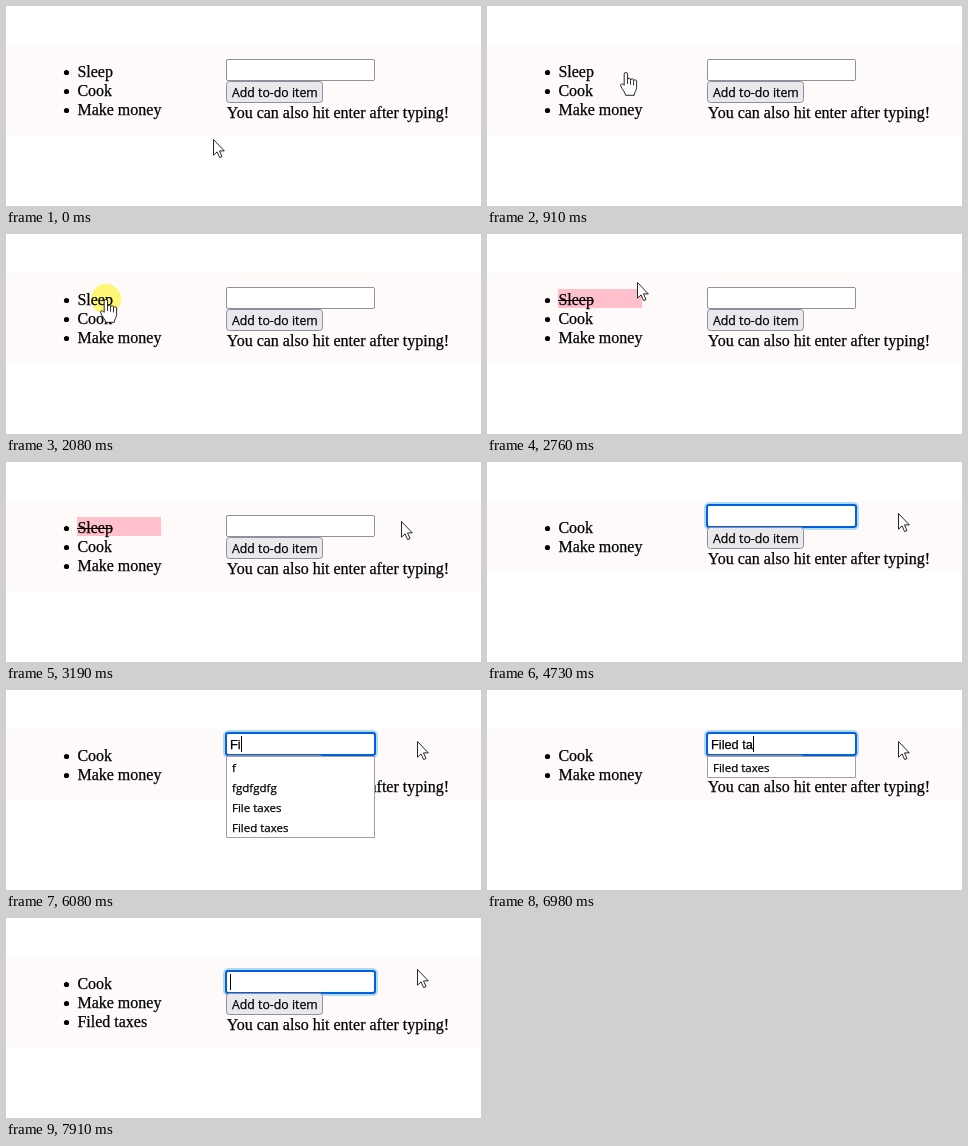
An HTML page with a canvas for the animation above (8 s loop, 475 px wide and 200 px high).

```html
<!DOCTYPE html>
<html lang="en">
<head>
<meta charset="utf-8">
<title>To-do list</title>
<style>
html, body { margin: 0; width: 100%; height: 100%; overflow: hidden; background: #fff; }
canvas { display: block; width: 475px; height: 200px; }
</style>
</head>
<body>
<canvas id="stage" width="475" height="200"></canvas>
<script>
const ctx = document.getElementById('stage').getContext('2d');
const LOOP = 8000;
const SERIF = '16px "Liberation Serif", "Times New Roman", serif';
const FIELD = '12.8px "Liberation Sans", Arial, sans-serif';
const BUTTON = '12.3px "Open Sans", "Noto Sans", sans-serif';
const MENU = '11.5px "Open Sans", "Noto Sans", sans-serif';

// Moments of the story, in ms
const CLICK = 2080, PRESS = 100, REMOVED = 3230, FOCUS = 4210;
const TYPING = 5840, KEY_GAP = 150, SUBMIT = 7680, CLEARED = 7910;
const BLINK = 520, LOOKUP = 120;

const WORD = 'Filed taxes';
const HINTS = ['f', 'fgdfgdfg', 'File taxes', 'Filed taxes'];

const easeIn = u => u * u;
const easeOut = u => 1 - (1 - u) ** 2;
const smooth = u => u * u * (3 - 2 * u);

// Each glide starts where the one before it ended; lift bends it upwards
const HOME = [207, 133];
const GLIDES = [
  { from: 0, until: 810, to: [155, 67], ease: easeIn },
  { from: 830, until: 1330, to: [100, 65], ease: easeOut },
  { from: 2580, until: 3290, to: [411, 65], ease: smooth, lift: 31 },
  { from: 3790, until: 4190, to: [340, 57], ease: easeOut },
  { from: 4310, until: 4570, to: [411, 51], ease: smooth }
];

const ARROW = new Path2D('M.5 .5V16.2L4.1 12.9L6.6 18.6L9 17.5L6.5 11.9H11.3Z');
const HAND = new Path2D('M-1.8 13V2.2a1.7 1.7 0 0 1 3.4 0V7.6' +
  'a1.5 1.5 0 0 1 3 .4a1.5 1.5 0 0 1 3 .8a1.5 1.5 0 0 1 3 1.4' +
  'V15.5C10.6 18.5 8.4 20 8.2 23.3H-.4C-.6 20.5-4 17.5-5.3 13.8C-5.7 11.8-3.9 10.6-1.8 13.6');
const BEAM = new Path2D('M-3 -7.5H-1Q.5 -7.5 .5 -6Q.5 -7.5 2 -7.5H4M.5 -6.5V6.5M-3 7.5H-1Q.5 7.5 .5 6Q.5 7.5 2 7.5H4');

function pointer(t) {
  let [x, y] = HOME;
  for (const { from, until, to, ease, lift = 0 } of GLIDES) {
    if (t < from) break;
    const s = ease(Math.min(1, (t - from) / (until - from)));
    x += (to[0] - x) * s;
    y += (to[1] - y) * s - lift * 4 * s * (1 - s);
  }
  return [Math.round(x), Math.round(y)];
}

function keyCount(t) {
  return t < TYPING ? 0 : Math.min(WORD.length, Math.floor((t - TYPING) / KEY_GAP) + 1);
}

// The caret restarts its blink at every edit
function caretOn(t) {
  const n = keyCount(t);
  const edit = t >= CLEARED ? CLEARED : n ? TYPING + (n - 1) * KEY_GAP : FOCUS;
  return t >= FOCUS && Math.floor((t - edit) / BLINK) % 2 === 0;
}

function rect(x, y, w, h, color) {
  ctx.fillStyle = color;
  ctx.fillRect(x, y, w, h);
}

function disc(x, y, r, color) {
  ctx.fillStyle = color;
  ctx.beginPath();
  ctx.arc(x, y, r, 0, 2 * Math.PI);
  ctx.fill();
}

function box(x, y, w, h, r, fill, line, width = 1) {
  ctx.beginPath();
  ctx.roundRect(x, y, w, h, r);
  if (fill) {
    ctx.fillStyle = fill;
    ctx.fill();
  }
  ctx.strokeStyle = line;
  ctx.lineWidth = width;
  ctx.stroke();
}

// A hairline outline gives the letters a little more weight
function text(str, x, y, font) {
  ctx.font = font;
  ctx.fillStyle = ctx.strokeStyle = '#000';
  ctx.lineWidth = .25;
  ctx.fillText(str, x, y);
  ctx.strokeText(str, x, y);
}

function drawList(items, t) {
  items.forEach((item, i) => {
    const y = 55 + 19 * i;
    const struck = item === 'Sleep' && t >= CLICK + PRESS;
    if (struck) rect(71, y, 84, 19, '#ffc0cb');
    disc(60.5, y + 11.5, 2.6, '#000');
    text(item, 71.4, y + 16, SERIF);
    if (struck) rect(71, y + 11, ctx.measureText(item).width, 1, '#000');
  });
}

function drawField(top, t, hover) {
  box(220.5, top + .5, 148, 21, 1.5, '#fff', hover ? '#676774' : '#8f8f9d');
  if (t >= FOCUS) {
    box(218, top - 2, 153, 26, 4.5, null, '#b0daf3', 2);
    box(220, top, 149, 22, 2, null, '#0060df', 2);
  }
  const typed = t < SUBMIT ? WORD.slice(0, keyCount(t)) : '';
  text(typed, 224, top + 16, FIELD);
  if (caretOn(t)) rect(Math.round(224 + ctx.measureText(typed).width), top + 3, 1, 16, '#000');
}

function drawPopup(t) {
  const query = WORD.slice(0, keyCount(t - LOOKUP)).toLowerCase();
  if (!query || t >= SUBMIT) return;
  const hints = HINTS.filter(h => h.toLowerCase().startsWith(query));
  box(220.5, 66.5, 148, hints.length * 20 + 1, 0, '#fff', '#a0a0a0');
  hints.forEach((h, i) => text(h, 226, 82 + 20 * i, MENU));
}

function drawPointer(x, y, shape) {
  ctx.save();
  ctx.translate(x, y);
  ctx.strokeStyle = '#000';
  ctx.lineJoin = 'round';
  ctx.lineWidth = shape === BEAM ? 1.1 : .85;
  ctx.fillStyle = '#fff';
  if (shape !== BEAM) ctx.fill(shape);
  ctx.stroke(shape);
  if (shape === HAND) {
    for (let i = 0; i < 3; i++) rect(1.2 + 3 * i, 7.5 + i * .7, .8, 4.5, '#000');
  }
  ctx.restore();
}

function drawGlow(x, y) {
  ctx.globalCompositeOperation = 'multiply';
  disc(x, y, 15, '#fffb78');
  ctx.globalCompositeOperation = 'source-over';
}

function draw(t) {
  const items = ['Cook', 'Make money'];
  if (t < REMOVED) items.unshift('Sleep');
  if (t >= SUBMIT) items.push(WORD);
  const listHeight = 19 * items.length;
  const top = items.length === 3 ? 53 : 43;
  const [x, y] = pointer(t);
  const overField = x >= 220 && x < 369 && y >= top && y < top + 22;
  const overList = x >= 71 && x <= 155 && y >= 55 && y < 55 + listHeight;

  rect(0, 0, 475, 200, '#fff');
  rect(0, 39, 475, 33 + listHeight, '#fffafa');
  drawList(items, t);
  text('You can also hit enter after typing!', 220.7, top + 59, SERIF);
  drawField(top, t, overField);
  box(220.5, top + 22.5, 96, 21, 3, '#e9e9ed', '#8f8f9d');
  text('Add to-do item', 226, top + 38, BUTTON);
  drawPopup(t);
  if ([CLICK, FOCUS].some(c => t >= c && t < c + PRESS)) drawGlow(x, y);
  drawPointer(x, y, overField ? BEAM : overList ? HAND : ARROW);
}

const start = performance.now();
function tick(now) {
  draw(Math.max(0, now - start) % LOOP);
  requestAnimationFrame(tick);
}
draw(0);
requestAnimationFrame(tick);
</script>
</body>
</html>
```
